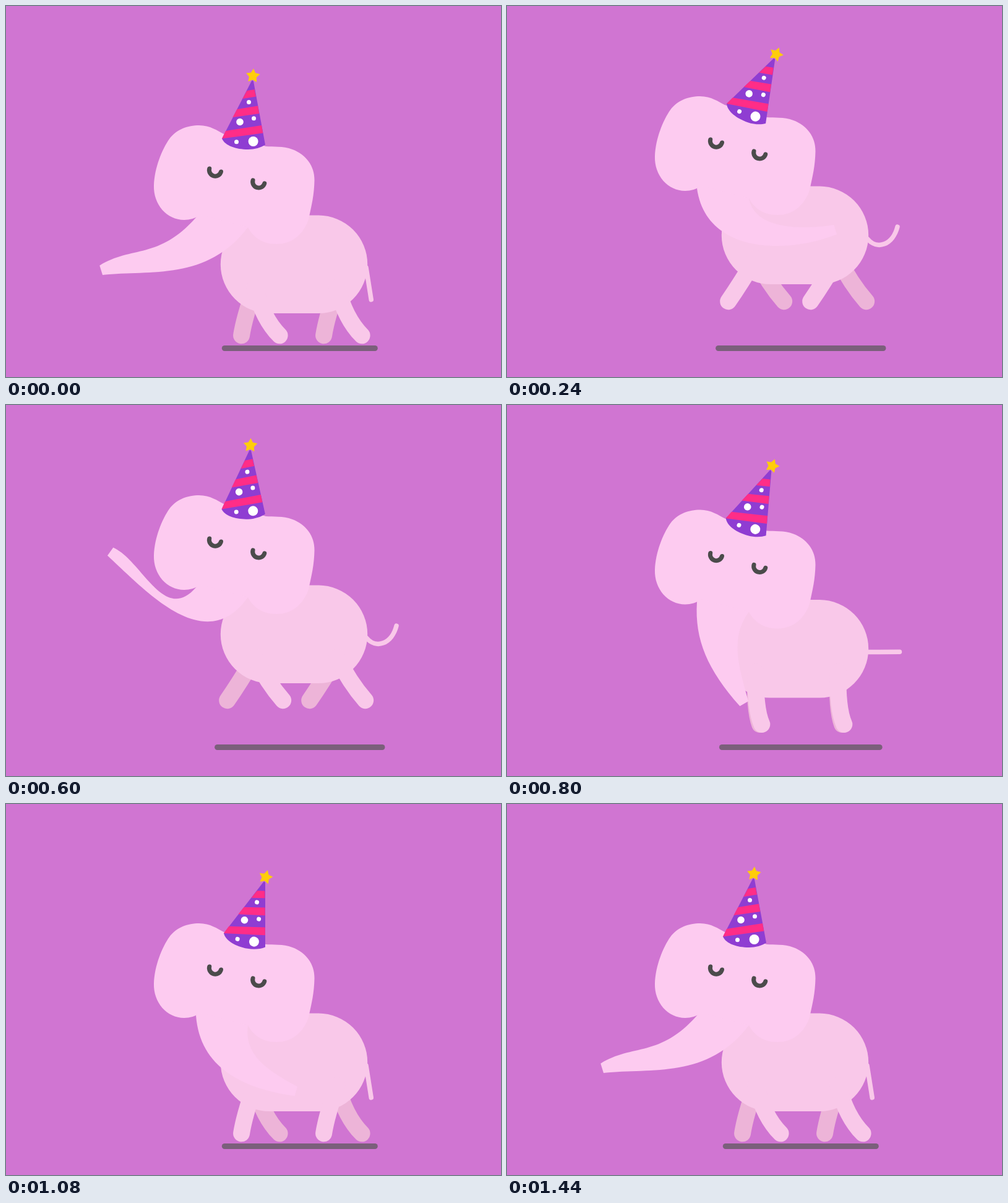
Recreate the animation shown at these times as an HTML page with a canvas. Size 800 px wide and 600 px high, loop 1.46 s.

```html
<!DOCTYPE html>
<html lang="en">
<head>
<meta charset="utf-8">
<title>Party elephant</title>
<style>
html, body { margin: 0; height: 100%; overflow: hidden; background: #d075d2; }
canvas { display: block; }
</style>
</head>
<body>
<canvas id="stage" width="800" height="600"></canvas>
<script>
const ctx = document.getElementById('stage').getContext('2d');
const LOOP = 1460, STRIDE = 720, BOUNCE = 360, DEG = Math.PI / 180;
const COLOR = {
  bg: '#d075d2', body: '#f9c8e9', head: '#fdcbf0', farLeg: '#edb4d8', shadow: '#7b5f7b',
  eye: '#4b4b4b', hat: '#8f3dd2', stripe: '#ff2d87', star: '#ffcd0a', dot: '#ffffff'
};

// Key poses of a stride: time, trunk angle (0 hangs down, positive to the left), trunk reach, hat tilt.
const POSES = [
  [0, 68.5, 211, 0],
  [80, -12, 160, 15.3],
  [240, -72, 190, 18.8],
  [360, -46, 165, 10.5],
  [540, 65, 200, -1],
  [600, 110, 193, -2]
];

const HEAD = new Path2D('M239 290C240 262 252 232 264 215C276 199 294 193 312 193C330 193 342 202 352 207' +
  'L420 227C432 228 447 226 463 232C484 240 499 258 498.5 282C498 306 494 322 489 345' +
  'C482 366 465 385 437 385C415 385 399 374 391 358L315 338C306 343 297 346 288 346C260 346 238 321 239 290Z');
const CONE = new Path2D('M396.5 122Q398 118.5 400 122L419 224.5C412 229 402 232 391 232C372 232 354 226 349 214.5Z');
const STRIPES = new Path2D('M389.3 137L401.7 135L404 146.5L382.3 150Z' +
  'M373.3 167L407 161.5L409.3 174L366.4 180Z' +
  'M355 202L413 193L415.3 205.5L349 214.5Z');
const DOTS = [[392.5, 155.5, 3.5], [378, 187.5, 5.8], [400.5, 181.7, 3.5], [372.5, 219.7, 3.5], [399.6, 219, 8]];

const clamp = u => Math.min(1, Math.max(0, u));
const smooth = u => (u = clamp(u)) * u * (3 - 2 * u);
const lerp = (a, b, u) => a + (b - a) * u;

// Height of the jump, 0 on the ground and 1 in the air.
function jump(time) {
  const t = time % BOUNCE;
  return smooth(t / 160) - smooth((t - 240) / 120);
}

// Smooth periodic interpolation that never overshoots its keys.
function sample(track, period, time) {
  const n = track.length, t = time % period;
  const key = i => track[(i + n) % n];
  const at = i => key(i)[0] + period * Math.floor(i / n);
  let i = n - 1;
  while (track[i][0] > t) i--;
  const span = at(i + 1) - at(i), u = (t - at(i)) / span;
  return key(i).slice(1).map((a, j) => {
    const value = k => key(k)[j + 1];
    const slope = k => (value(k + 1) - value(k)) / (at(k + 1) - at(k));
    const tangent = k => {
      const p = slope(k - 1), q = slope(k);
      return p * q <= 0 ? 0 : 2 * p * q / (p + q);
    };
    return lerp(a, value(i + 1), smooth(u)) +
      span * u * (1 - u) * (tangent(i) * (1 - u) - tangent(i + 1) * u);
  });
}

function fill(color, path) {
  ctx.fillStyle = color;
  path ? ctx.fill(path) : ctx.fill();
}

function stroke(color, width) {
  ctx.strokeStyle = color;
  ctx.lineWidth = width;
  ctx.stroke();
}

function drawShadow(height) {
  const half = 121.5 + 11.7 * height;
  ctx.beginPath();
  ctx.moveTo(474.8 - half, 553.5);
  ctx.lineTo(474.8 + half, 553.5);
  stroke(COLOR.shadow, 9);
}

function drawLegs(time, color) {
  const x = time / STRIDE * 360;
  const swing = Math.cos((x + 48) * DEG), bend = swing * swing;
  const footX = 407 + 46 * swing + 5 * Math.cos((2 * x - 30) * DEG);
  for (const dx of [0, 133]) {
    ctx.beginPath();
    ctx.moveTo(402 + dx, 455);
    ctx.quadraticCurveTo(400 + 23 * swing + dx, 515 - 20 * bend, footX + dx, 540 - 16 * bend);
    stroke(color, 27);
  }
}

// The tail swings up with the jump and sags near the top.
function drawTail(height) {
  const angle = (9 + 102 * (1 - (1 - height) ** 2.3)) * DEG;
  const x = 582, y = 423, sag = 26 * clamp(2 * height - 1);
  const tipX = x + 52.5 * Math.sin(angle), tipY = y + 52.5 * Math.cos(angle);
  ctx.beginPath();
  ctx.moveTo(x, y);
  ctx.bezierCurveTo(lerp(x, tipX, .33), lerp(y, tipY, .33) + sag,
    lerp(x, tipX, .85), lerp(y, tipY, .85) + sag, tipX, tipY);
  stroke(COLOR.body, 7.5);
}

function drawBody() {
  ctx.beginPath();
  ctx.arc(426, 417.8, 79.2, Math.PI / 2, Math.PI * 1.5);
  ctx.arc(505, 417.8, 79.2, -Math.PI / 2, Math.PI / 2);
  fill(COLOR.body);
}

// A tapered curve from the face to the tip; both edges are offsets of one centre line.
function drawTrunk(angle, reach) {
  const stretch = Math.sin(angle * DEG) ** 2, heading = 1.28 * angle - 15;
  const walk = (x, y, deg, d) => [x - d * Math.sin(deg * DEG), y + d * Math.cos(deg * DEG)];
  const side = ([x, y], deg, d) => [x + d * Math.cos(deg * DEG), y + d * Math.sin(deg * DEG)];
  const tip = walk(350, 350, angle, reach);
  const lower = walk(...tip, heading, -68);
  const upper = [325 + .2 * (tip[0] - 350), 400 + 32 * stretch];
  const edge = sign => [
    side(upper, .35 * angle, sign * (28 + 17 * stretch)),
    side(lower, .75 * angle, sign * 25),
    side(tip, heading, sign * 8)
  ];
  const [a, b, outerTip] = edge(-1), [d, c, innerTip] = edge(1);
  ctx.beginPath();
  ctx.moveTo(307, 342);
  ctx.bezierCurveTo(...a, ...b, ...outerTip);
  ctx.lineTo(...innerTip);
  ctx.bezierCurveTo(...c, ...d, 391, 358);
  ctx.lineTo(391, 325);
  ctx.lineTo(320, 325);
  fill(COLOR.head);
}

function drawEyes() {
  for (const [x, y] of [[338.1, 265.5], [408.4, 284.3]]) {
    ctx.beginPath();
    ctx.arc(x, y, 9.7, .26, Math.PI + .26);
    stroke(COLOR.eye, 7);
  }
}

function drawHat(tilt) {
  ctx.save();
  ctx.translate(380.5, 228);
  ctx.rotate(tilt * DEG);
  ctx.translate(-380.5, -228);
  fill(COLOR.hat, CONE);
  fill(COLOR.stripe, STRIPES);
  for (const [x, y, r] of DOTS) {
    ctx.beginPath();
    ctx.arc(x, y, r, 0, 7);
    fill(COLOR.dot);
  }
  ctx.beginPath();
  for (let i = 0; i < 10; i++) {
    const r = i % 2 ? 6.2 : 11.8, a = (i * 36 - 85) * DEG;
    ctx.lineTo(399 + r * Math.cos(a), 113 + r * Math.sin(a));
  }
  fill(COLOR.star);
  ctx.restore();
}

function draw(now) {
  const time = Math.floor((now % LOOP + .5) / 20) * 20;
  const height = jump(time);
  const [trunkAngle, trunkReach, hatTilt] = sample(POSES, STRIDE, time);
  ctx.lineCap = 'round';
  ctx.fillStyle = COLOR.bg;
  ctx.fillRect(0, 0, 800, 600);
  drawShadow(height);

  ctx.save();
  ctx.translate(0, -47 * height);
  drawLegs(time + STRIDE / 2, COLOR.farLeg);
  drawTail(height);
  drawBody();
  drawLegs(time, COLOR.body);
  drawTrunk(trunkAngle, trunkReach);
  fill(COLOR.head, HEAD);
  drawEyes();
  drawHat(hatTilt);
  ctx.restore();
  requestAnimationFrame(draw);
}
requestAnimationFrame(draw);
</script>
</body>
</html>
```
